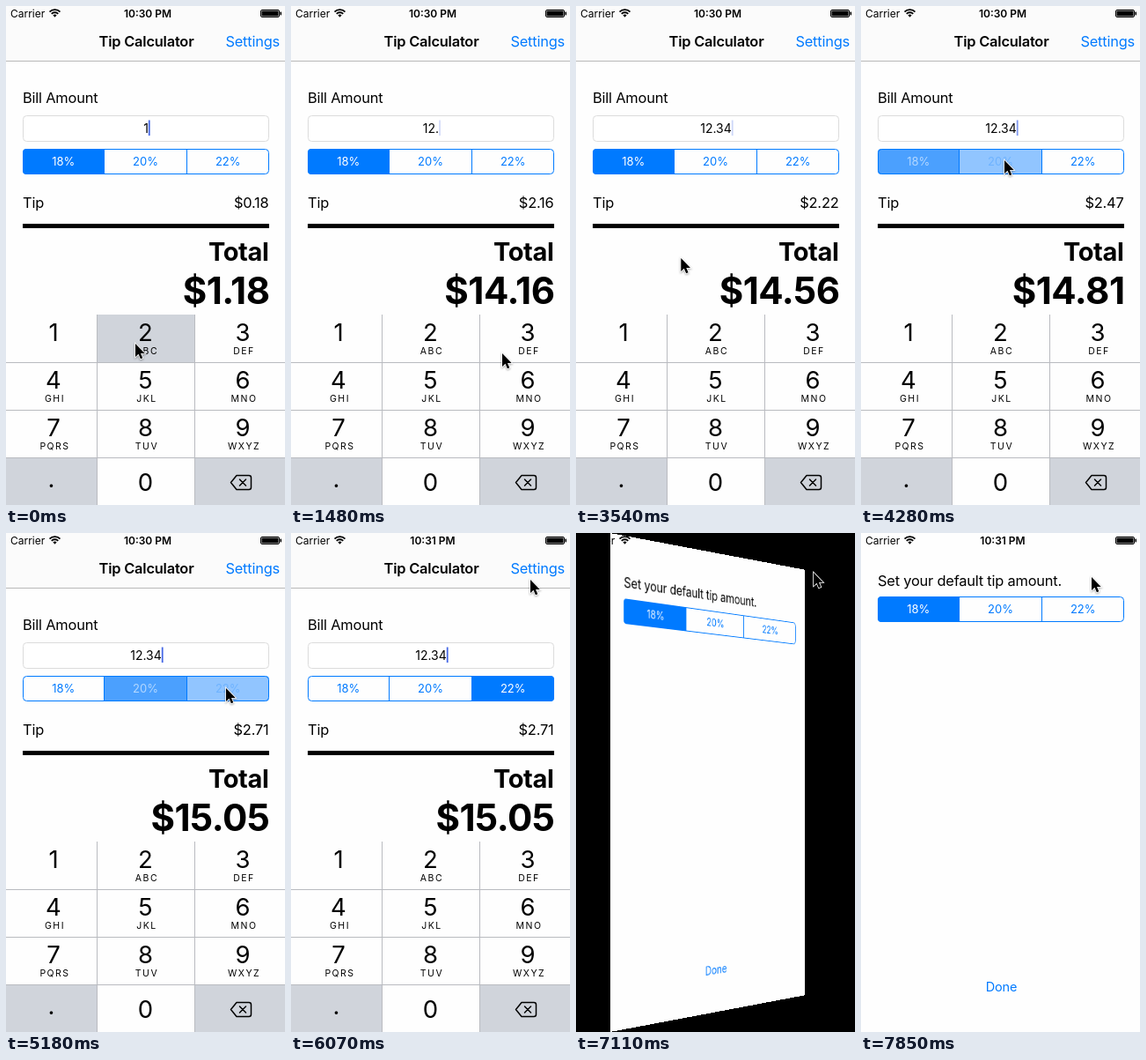
An HTML page that plays this animation: 317x566 px, repeating every 7990 ms.

```html
<!DOCTYPE html>
<html lang="en">
<head>
<meta charset="utf-8">
<title>Tip Calculator</title>
<style>
  html, body { margin: 0; width: 100%; height: 100%; overflow: hidden; background: #000; }
  #stage { position: relative; width: 317px; height: 566px; overflow: hidden; background: #000; perspective: 1200px; }
  svg { position: absolute; left: 0; top: 0; width: 317px; height: 566px; overflow: hidden; }
  #pointer { overflow: visible; filter: drop-shadow(0 1px 1px rgba(0, 0, 0, .35)); }
  text { font-family: Inter, "Open Sans", sans-serif; font-size: 16.4px; letter-spacing: -.012em; }
  .mid { text-anchor: middle; }
  .end { text-anchor: end; }
  .link { fill: #007aff; }
  .bold { font-weight: 700; }
  .semi { font-weight: 600; }
  .status { font-size: 12px; letter-spacing: 0; }
  .field { font-size: 14px; letter-spacing: 0; }
  .seg { font-size: 13px; letter-spacing: 0; }
  .digit { font-size: 27.5px; letter-spacing: 0; }
  .letters { font-size: 10.5px; letter-spacing: 1.5px; }
</style>
</head>
<body>
<div id="stage">
  <svg id="main"></svg>
  <svg id="prefs"></svg>
  <svg id="keys"></svg>
  <svg id="status"></svg>
  <svg id="pointer">
    <path d="M0 0V15L3.5 11.8 5.9 17.2 8.3 16.2 6 10.9H10.7Z" stroke="#fff" stroke-width="1.6" paint-order="stroke"/>
  </svg>
</div>
<script>
const LOOP = 7990, TICKS = 54, STEP = LOOP / TICKS;
const PAPER = '#fefefe', KEY_GREY = '#d0d4db';
const $ = id => document.getElementById(id);

const rect = (x, y, w, h, attrs) => `<rect x="${x}" y="${y}" width="${w}" height="${h}" ${attrs}/>`;
const text = (x, y, s, cls = '', id = '') => `<text x="${x}" y="${y}" class="${cls}" id="${id}">${s}</text>`;

// Segmented control
const SEG_EDGES = [19, 111.5, 205.5, 299];
function segments(id, y) {
  let fills = '', labels = '', lines = '';
  ['18%', '20%', '22%'].forEach((label, i) => {
    const a = SEG_EDGES[i], b = SEG_EDGES[i + 1];
    fills += rect(a, y, b - a, 29, `id="${id}Fill${i}" fill="#007aff"`);
    labels += text((a + b) / 2, y + 19.2, label, 'seg mid', id + 'Label' + i);
    if (i) lines += rect(a - .5, y, 1, 29, 'fill="#007aff"');
  });
  return `<clipPath id="${id}Clip">${rect(19, y, 280, 29, 'rx="4"')}</clipPath>
    <g clip-path="url(#${id}Clip)">${fills}${lines}</g>${labels}` +
    rect(19.5, y + .5, 279, 28, 'rx="4" fill="none" stroke="#007aff"');
}

function paintSegments(id, levels) {
  levels.forEach((v, i) => {
    $(id + 'Fill' + i).setAttribute('opacity', v);
    $(id + 'Label' + i).style.fill = `rgb(${255 * v}, ${122 + 133 * v}, 255)`;
  });
}

// Keypad
const COL_X = [0, 103.5, 214.5, 317], KEY_X = [54, 158.5, 269];
function keypad() {
  const letters = ['', 'ABC', 'DEF', 'GHI', 'JKL', 'MNO', 'PQRS', 'TUV', 'WXYZ'];
  let s = rect(0, 350, 317, 216, `fill="${PAPER}"`), top = '';
  for (let i = 0; i < 12; i++) {
    const c = i % 3, y = 350 + 54 * Math.floor(i / 3);
    s += rect(COL_X[c], y, COL_X[c + 1] - COL_X[c], 54, `id="key${i}"`);
    if (i < 9) top += text(KEY_X[c], y + 30, i + 1, 'digit mid') +
      text(KEY_X[c] + 1.5, y + 45, letters[i], 'letters mid');
  }
  for (const y of [404, 458, 512]) s += rect(0, y, 317, 1, 'fill="#b9bbc0"');
  for (const x of [103, 214]) s += rect(x, 350, 1, 216, 'fill="#b9bbc0"');
  return s + top + text(51.5, 545.5, '.', 'digit mid') + text(158.5, 549.5, '0', 'digit mid') +
    `<path d="M262 532.5H276Q278.5 532.5 278.5 535V546Q278.5 548.5 276 548.5H262L255.5 540.5ZM265.5 537L272.5 544M272.5 537L265.5 544"
      fill="none" stroke="#000" stroke-width="1.5" stroke-linejoin="round" stroke-linecap="round"/>`;
}

$('main').innerHTML =
  rect(0, 0, 317, 566, `fill="${PAPER}"`) + rect(0, 0, 317, 62, 'fill="#fbfbfb"') +
  rect(0, 62, 317, 1, 'fill="#b8b8b8"') +
  text(159.5, 46, 'Tip Calculator', 'semi mid') + text(311, 46, 'Settings', 'link end', 'settings') +
  text(19, 109.5, 'Bill Amount') +
  rect(19.5, 124.5, 279, 29, 'rx="4" fill="#fff" stroke="#dcdcdc"') +
  text(159, 144, '', 'field mid', 'bill') + rect(0, 129.5, 1.8, 17.5, 'id="caret" fill="#4668e6"') +
  segments('rate', 162) +
  text(19, 228.5, 'Tip') + text(298.5, 228.5, '', 'end', 'tip') +
  rect(19, 247, 280, 5, '') +
  `<g style="font-size:29px">${text(298.5, 288.5, 'Total', 'bold end', 'totalLabel')}</g>` +
  text(299.5, 337.5, '', 'bold end', 'total');
$('totalLabel').style.fontSize = '29px';
$('total').style.fontSize = '42px';

$('prefs').innerHTML =
  rect(0, 0, 317, 566, `fill="${PAPER}"`) +
  text(19, 59.5, 'Set your default tip amount.') + segments('pref', 72) +
  text(159.5, 519.5, 'Done', 'link mid', 'done');
$('done').style.fontSize = '14.5px';
paintSegments('pref', [1, 0, 0]);

$('keys').innerHTML = keypad();

const arc = r => `M${55.5 - r * .72} ${12.5 - r * .7}A${r} ${r} 0 0 1 ${55.5 + r * .72} ${12.5 - r * .7}`;
$('status').innerHTML =
  text(5, 12.5, 'Carrier', 'status') +
  `<path d="${arc(8.3)}${arc(5.2)}" fill="none" stroke="#000" stroke-width="1.8"/>
   <path d="M55.5 12.8L53.4 10.4Q55.5 8.8 57.6 10.4Z"/>` +
  text(161, 12.5, '', 'status semi mid', 'clock') +
  rect(289.5, 4.5, 21, 8, 'rx="1.5" fill="none" stroke="#000"') + rect(290.5, 5.5, 19, 6, '') +
  rect(311.5, 6.5, 1.5, 4, 'rx=".7"');

// Timeline: the first value of each entry is a tick
const TYPED = [[0, '1'], [1, '12'], [6, '12.'], [12, '12.3'], [19, '12.34']];
const PRESSES = { 0: 1, 5: 9, 11: 2, 18: 3 };
const RATES = [[0, .18], [29, .2], [35, .22]];
const PATH = [
  [0, 147, 383], [1, 147, 383], [5, 50, 533], [6, 50, 533], [8, 92, 439], [10, 240, 394],
  [11, 264, 379], [13, 264, 379], [16, 92, 437], [17, 61, 434], [20, 61, 434], [27, 163, 175],
  [30, 163, 175], [33, 250, 176], [36, 250, 176], [41, 272, 53], [43, 271, 44], [46, 271, 44],
  [50, 269, 46], [52, 269, 46], [53, 262, 50]
];
const FLIP_AT = 6600, FLIP_MS = 750, SLIDE_MS = 500;

const clamp = v => Math.min(1, Math.max(0, v));
const latest = (list, n) => list.filter(e => e[0] <= n).pop();

function bezier(x1, y1, x2, y2) {
  const at = (a, b, p) => 3 * (1 - p) ** 2 * p * a + 3 * (1 - p) * p * p * b + p ** 3;
  return x => {
    let lo = 0, hi = 1;
    for (let i = 0; i < 24; i++) {
      const p = (lo + hi) / 2;
      if (at(x1, x2, p) < x) lo = p; else hi = p;
    }
    return at(y1, y2, lo);
  };
}
const easeFlip = bezier(.42, 0, .58, 1), easeSlide = bezier(.38, .7, .125, 1);

function pointerAt(n) {
  const i = Math.max(1, PATH.findIndex(p => p[0] >= n));
  const [a, b] = [PATH[i - 1], PATH[i]], k = (n - a[0]) / (b[0] - a[0]);
  return [1, 2].map(j => a[j] + (b[j] - a[j]) * k);
}

// Crossfade of the selection, beginning one tick before the rate changes
function rateLevels(n) {
  const levels = [1, 0, 0];
  for (let i = 1; i < 3; i++) {
    const k = Math.min(3, n - RATES[i][0] + 1);
    if (k < 0) break;
    levels[i - 1] = [1, .7, .15, 0][k];
    levels[i] = [.2, .43, .85, 1][k];
  }
  return levels;
}

function caretLevel(ms) {
  const p = ms % 1000;
  return p < 700 ? 1 - clamp((p - 400) / 250) : clamp((p - 700) / 150);
}

function turn(el, deg) {
  el.style.display = Math.abs(deg) < 90 ? '' : 'none';
  const push = 158.5 * Math.abs(Math.sin(deg * Math.PI / 180));
  el.style.transform = deg ? `translateZ(${-push}px) rotateY(${deg}deg)` : 'none';
}

function draw(n) {
  const t = n * STEP;
  const [typedAt, bill] = latest(TYPED, n);
  const tip = bill * latest(RATES, n)[1];
  $('bill').textContent = bill;
  $('tip').textContent = '$' + tip.toFixed(2);
  $('total').textContent = '$' + (+bill + tip).toFixed(2);
  $('clock').textContent = n < 38 ? '10:30 PM' : '10:31 PM';
  $('settings').style.opacity = n < 44 ? 1 : .75;
  paintSegments('rate', rateLevels(n));

  for (let i = 0; i < 12; i++) {
    const grey = (i === 9 || i === 11) !== (PRESSES[n] === i);
    $('key' + i).setAttribute('fill', grey ? KEY_GREY : PAPER);
  }

  const angle = 180 * easeFlip(clamp((t - FLIP_AT) / FLIP_MS));
  const slide = 216 * easeSlide(clamp((t - FLIP_AT) / SLIDE_MS));
  turn($('main'), t < FLIP_AT ? 0 : -angle);
  turn($('prefs'), t >= FLIP_AT + FLIP_MS ? 0 : 180 - angle);
  $('keys').style.display = t < FLIP_AT + SLIDE_MS ? '' : 'none';
  $('keys').style.transform = t < FLIP_AT ? 'none' : `translateY(${slide}px)`;

  if (t < FLIP_AT) $('caret').setAttribute('x', 159 + $('bill').getComputedTextLength() / 2);
  $('caret').setAttribute('opacity', t < FLIP_AT ? caretLevel(t - typedAt * STEP) : 0);

  const [x, y] = pointerAt(n);
  $('pointer').style.transform = `translate(${x}px, ${y}px)`;
}

const start = performance.now();
let shown = -1;
function loop() {
  const t = (performance.now() - start) % LOOP;
  const n = Math.min(TICKS - 1, Math.floor((t + 14) / STEP));
  if (n !== shown) draw(shown = n);
  requestAnimationFrame(loop);
}
loop();
</script>
</body>
</html>
```
